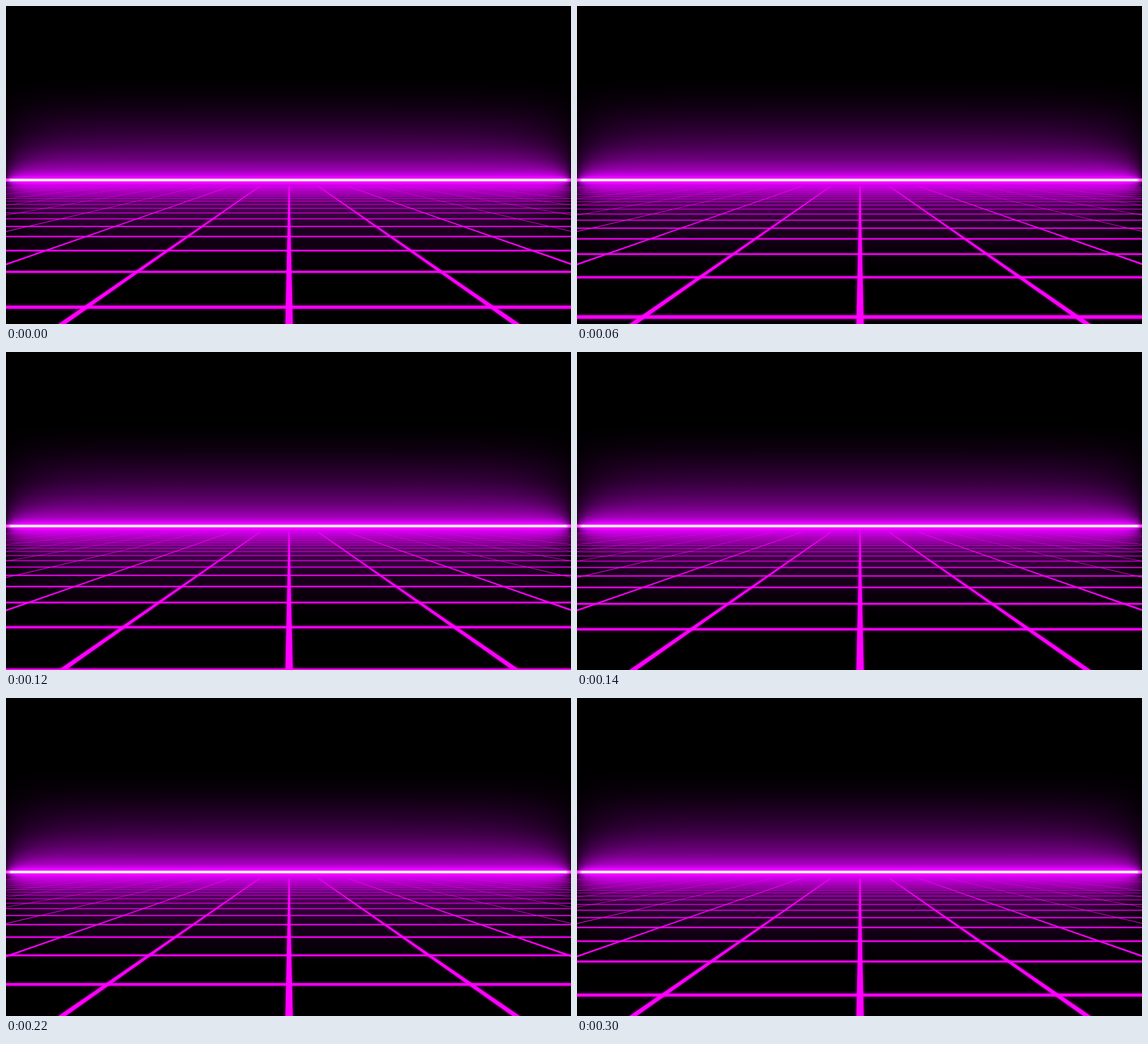
Write an HTML page with a canvas that moves like this. It is 998 by 561 pixels and loops after 0.36 s.

```html
<!DOCTYPE html>
<html>
<head>
<meta charset="utf-8">
<title>Neon grid</title>
<style>
  html, body { margin: 0; width: 100%; height: 100%; overflow: hidden; background: #000; }
  canvas { display: block; }
</style>
</head>
<body>
<canvas id="stage" width="998" height="561"></canvas>
<script>
const W = 998, H = 561;
const HORIZON = 307, GRID_TOP = 317.5;
const VANISH = { x: 500, y: 282 };
const DEPTH = 748;            // screen drop below the vanishing point at distance 1
const SPREAD = 401 / 279;     // sideways run of neighbouring rails per pixel of drop
const RAIL = 13 / 279;        // rail width per pixel of drop
const ctx = document.getElementById('stage').getContext('2d');

// [distance from horizon, brightness]
const SKY = [[0, 255], [4, 250], [7, 215], [12, 180], [17, 158], [27, 130], [37, 108], [57, 77],
  [82, 50], [107, 31], [132, 15], [157, 5], [182, 0]];
const FLOOR = [[0, 255], [5, 250], [8, 215], [14, 182], [23, 145], [38, 92], [53, 64],
  [83, 30], [123, 10], [165, 0]];

const clamp = (v, lo, hi) => Math.max(lo, Math.min(hi, v));

function sample(points, d) {
  const i = points.findIndex(p => p[0] > d);
  if (i < 0) return 0;
  const [x0, y0] = points[i - 1], [x1, y1] = points[i];
  return y0 + (y1 - y0) * (d - x0) / (x1 - x0);
}

function makeGlow() {
  const image = ctx.createImageData(W, H);
  for (let y = 0; y < H; y++) {
    const dy = y + 0.5 - HORIZON, d = Math.abs(dy);
    const level = sample(dy < 0 ? SKY : FLOOR, d);
    const white = clamp((2.9 - d) / 1.4, 0, 1) * 255;
    const reach = 5 + Math.min(d, 75) * 0.7;
    for (let x = 0; x < W; x++) {
      const side = Math.min(x, W - 1 - x);
      const v = level * (d < 3 ? 1 : 1 - 0.75 * Math.exp(-side / reach));
      const p = (y * W + x) * 4;
      image.data[p] = v;
      image.data[p + 1] = white * clamp(side / 9, 0.3, 1);
      image.data[p + 2] = v * 1.14;
      image.data[p + 3] = 255;
    }
  }
  return image;
}

function drawRail(k) {
  const edge = (y, half) => [VANISH.x + (k * SPREAD + half * RAIL) * (y - VANISH.y), y];
  ctx.beginPath();
  ctx.moveTo(...edge(GRID_TOP, -0.5));
  ctx.lineTo(...edge(GRID_TOP, 0.5));
  ctx.lineTo(...edge(H + 10, 0.5));
  ctx.lineTo(...edge(H + 10, -0.5));
  ctx.fill();
}

function drawRung(n) {
  const y = VANISH.y + DEPTH / n, thick = 0.9 + 40 / (n * n);
  ctx.globalAlpha = Math.min(1, (7 / n) ** 1.5);
  ctx.shadowBlur = 15 / n;
  ctx.fillRect(-20, y - thick / 2, W + 40, thick);
}

const glow = makeGlow();

// Advances every 20 ms, with one doubled step and a pause at the end.
function stepAt(ms) {
  const tick = Math.floor(ms / 20);
  return Math.min(14, tick > 4 ? tick - 1 : tick);
}

function draw(now) {
  const shift = 0.065 * stepAt(now % 360);
  ctx.putImageData(glow, 0, 0);
  ctx.save();
  ctx.beginPath();
  ctx.rect(0, GRID_TOP, W, H);
  ctx.clip();
  ctx.fillStyle = '#f0f';
  ctx.shadowColor = 'rgba(255,0,255,0.6)';
  for (let k = 3; k - shift < 20.8; k++) drawRung(k - shift);
  ctx.globalAlpha = 1;
  for (let k = -9; k <= 9; k++) {
    ctx.shadowBlur = Math.max(0, 6 - 2 * Math.abs(k));
    drawRail(k);
  }
  ctx.restore();
}

const start = performance.now();
function loop() {
  draw(performance.now() - start);
  requestAnimationFrame(loop);
}
loop();
</script>
</body>
</html>
```
